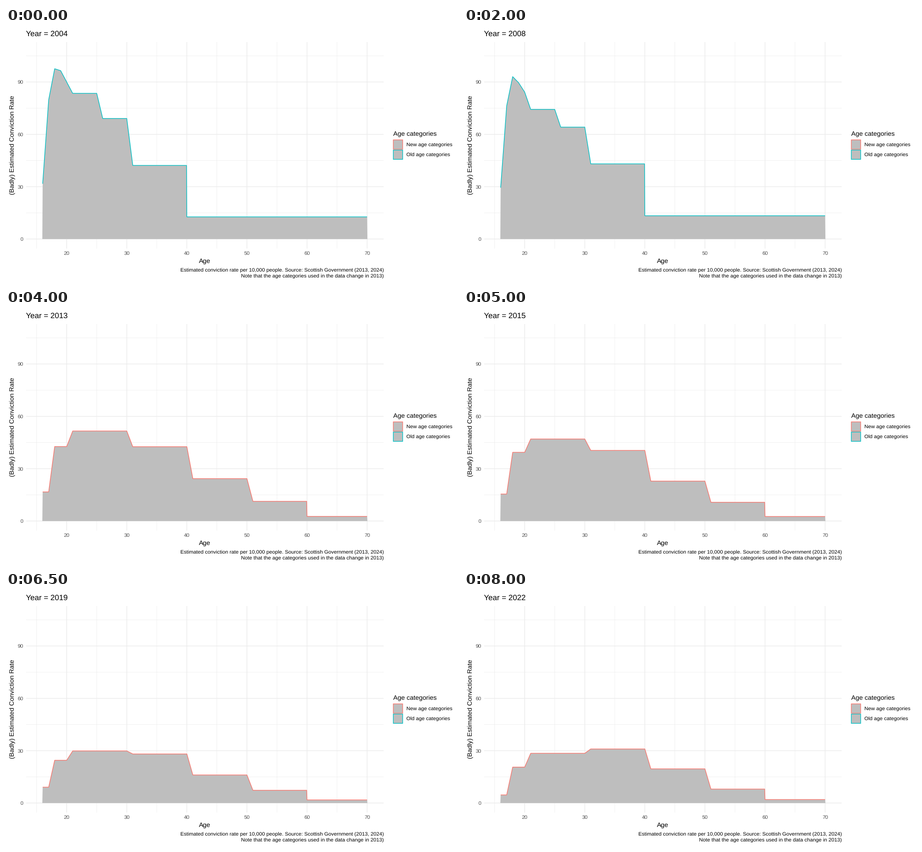
A matplotlib script for the animation above (9500 ms loop, 998 px wide and 561 px high).

```python
import matplotlib.pyplot as plt
import numpy as np
from matplotlib.animation import FuncAnimation
from matplotlib.patches import Polygon, Rectangle

W, H, DPI = 998, 561, 100
PT = 72 / DPI                      # points per pixel
LEFT, RIGHT, TOP, BOTTOM = 44.4, 833.8, 31, 487.2
GRID, FILL, INK, TICK = "#EBEBEB", "#BEBEBE", "black", "#4D4D4D"
NEW, OLD = "#F8766D", "#00BFC4"
SMALL, MEDIUM, LARGE = 11.46, 14.37, 17.14
LINE = 1.42
STEPS, FRAMES = 17, 19             # the last step is held
SWITCH = 8                         # first step with the new categories
NUDGE = 0.054                      # width of the steep edges, in years

# Ages where the bands begin and end, and band rates at a few key steps
OLD_BANDS = [(16,), (17,), (18,), (19,), (20,), (21, 25), (26, 30),
             (31, 40 - NUDGE), (40, 70)]
OLD_KEYS = {
    0: (31.7, 79.8, 97.6, 96.5, 90, 83.5, 69.1, 42.2, 12.7),
    3: (33.4, 86.3, 103.8, 99.1, 92, 80, 67.4, 43.5, 13.35),
    6: (14.8, 38.2, 52.5, 54.8, 55.9, 56.2, 53.6, 41, 13.05),
}
NEW_BANDS = [(16, 17), (18, 20), (21, 30), (31, 40), (41, 50),
             (51, 60 - NUDGE), (60, 70)]
NEW_KEYS = {
    8: (16.7, 42.7, 51.6, 42.6, 24.3, 11.3, 2.65),
    11: (14.45, 36.6, 43.2, 38.7, 21.7, 10.3, 2.55),
    14: (4.6, 14.4, 18.7, 19.3, 11.4, 4.8, 1.15),
    16: (4.65, 20.6, 28.5, 31, 19.6, 8, 2),
}
OLD_CURVE = np.polyfit(list(OLD_KEYS), list(OLD_KEYS.values()), 2)


def old_rates(step):
    """Parabola through the key steps; the fall slows down at the end."""
    t = min(step, 4.8 + step / 5)
    return OLD_CURVE[0] * t * t + OLD_CURVE[1] * t + OLD_CURVE[2]


def new_rates(step):
    """Ease in from one key step to the next."""
    start = max(k for k in NEW_KEYS if k <= step)
    end = min(k for k in NEW_KEYS if k >= step)
    u = ((step - start) / max(end - start, 1)) ** 1.5
    return (1 - u) * np.array(NEW_KEYS[start]) + u * np.array(NEW_KEYS[end])


def px(age):
    return 134.0 + (age - 20) * 13.266


def py(rate):
    return 466.1 - rate * 3.8535


def outline(step):
    bands, rates = ((OLD_BANDS, old_rates(step)) if step < SWITCH
                    else (NEW_BANDS, new_rates(step)))
    return [(px(age), py(rate))
            for band, rate in zip(bands, rates) for age in band]


plt.rcParams["font.family"] = "Liberation Sans"
plt.rcParams["text.hinting"] = "none"
fig = plt.figure(figsize=(W / DPI, H / DPI), dpi=DPI, facecolor="white")
ax = fig.add_axes([0, 0, 1, 1])
ax.set_xlim(0, W)
ax.set_ylim(H, 0)
ax.axis("off")


def label(x, y, text, size=SMALL, color=INK, ha="left", **kw):
    return ax.text(x, y, text, fontsize=size * PT, color=color, ha=ha,
                   va="baseline", **kw)


def rule(xs, ys, width):
    ax.plot(xs, ys, color=GRID, lw=width * PT, solid_capstyle="butt",
            snap=False, zorder=1)


def grid(ages, rates, width):
    for rate in rates:
        rule((LEFT, RIGHT), (py(rate), py(rate)), width)
    for age in ages:
        rule((px(age), px(age)), (TOP, BOTTOM), width)


grid(range(15, 70, 10), range(15, 110, 30), 0.7)
grid(range(20, 80, 10), range(0, 100, 30), 1.4)

for age in range(20, 80, 10):
    label(px(age), 501.2, str(age), color=TICK, ha="center")
for rate in range(0, 100, 30):
    label(38.3, py(rate) + 4, str(rate), color=TICK, ha="right")

label(439.2, 519.2, "Age", MEDIUM, ha="center")
label(17.9, 258.8, "(Badly) Estimated Conviction Rate", MEDIUM, ha="center",
      rotation=90, rotation_mode="anchor")
label(834, 538.8, "Estimated conviction rate per 10,000 people. "
      "Source: Scottish Government (2013, 2024)", ha="right")
label(834, 551.3, "Note that the age categories used in the data "
      "change in 2013)", ha="right")

label(854.6, 237.8, "Age categories", MEDIUM)
for top, color, name in ((247.1, NEW, "New age categories"),
                         (269.5, OLD, "Old age categories")):
    ax.add_patch(Rectangle((855.2, top), 20.6, 20.6, fc=FILL, ec=color,
                           lw=LINE * PT, snap=False))
    label(883.6, top + 14.5, name)

title = label(44.4, 19.2, "", LARGE)
area = ax.add_patch(Polygon([(0, 0), (1, 1), (1, 0)], fc=FILL, ec="none",
                            lw=0, snap=False, zorder=2))
edge, = ax.plot([], [], lw=LINE * PT, solid_capstyle="butt",
                solid_joinstyle="round", snap=False, zorder=3)


def update(frame):
    step = min(frame, STEPS - 1)
    points = outline(step)
    title.set_text(f"Year = {round(2004 + step * 18 / (STEPS - 1))}")
    area.set_xy([(px(16 - NUDGE), py(0)), *points, (px(70 + NUDGE), py(0))])
    edge.set_data(*zip(*points))
    edge.set_color(OLD if step < SWITCH else NEW)
    return title, area, edge


anim = FuncAnimation(fig, update, frames=FRAMES, interval=500, repeat=True,
                     repeat_delay=0, blit=False)
plt.show()
```
